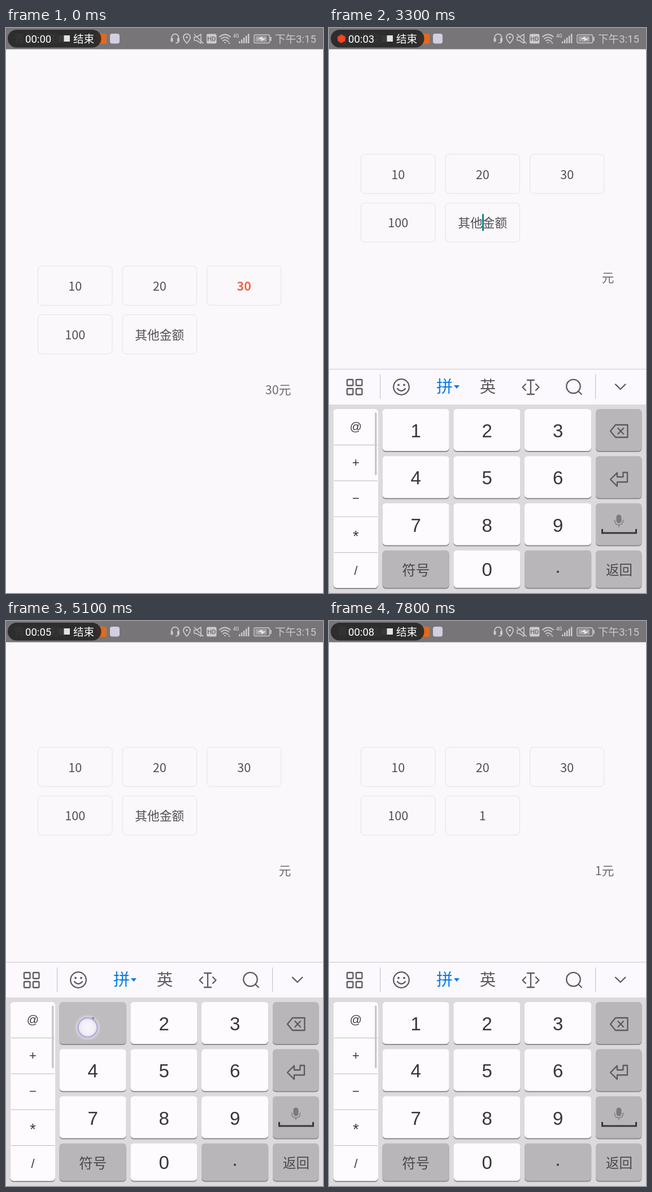
An HTML page for the animation above (8 s loop, 561 by 998 pixels).

```html
<!DOCTYPE html>
<html lang="zh">
<head>
<meta charset="utf-8">
<title>Amount picker</title>
<style>
html, body { margin: 0; width: 100%; height: 100%; overflow: hidden; background: #fbf8fc; }
svg { display: block; width: 100vw; height: 100vh; }
text { font-family: "Noto Sans CJK SC", "Noto Sans CJK", sans-serif; white-space: pre; }
.bar { font-family: Roboto, "Noto Sans CJK SC", "Noto Sans CJK", sans-serif; }
.num { font-family: "Liberation Sans", Arial, sans-serif; }
.line { fill: none; stroke: #5c5a5e; stroke-width: 2.3; stroke-linejoin: round; stroke-linecap: round; }
.icon { fill: none; stroke: #cccacc; stroke-width: 1.8; stroke-linecap: round; stroke-linejoin: round; }
</style>
</head>
<body>
<svg id="stage" viewBox="0 0 561 998" preserveAspectRatio="none">
  <defs>
    <radialGradient id="dot">
      <stop offset="0" stop-color="#faf8fc"/>
      <stop offset=".7" stop-color="#f3f0f8"/>
      <stop offset="1" stop-color="#dedaee"/>
    </radialGradient>
    <radialGradient id="glow">
      <stop offset=".7" stop-color="#e8e4f6" stop-opacity=".7"/>
      <stop offset="1" stop-color="#e8e4f6" stop-opacity="0"/>
    </radialGradient>
  </defs>
  <rect width="561" height="998" fill="#fbf8fc"/>
  <g id="page"></g>
  <g id="board"></g>
  <g id="status"></g>
  <g id="touch">
    <circle id="halo" r="24" fill="url(#glow)"/>
    <circle id="core" r="17" fill="url(#dot)"/>
    <circle id="ring" r="17" fill="none" stroke="#aaa5d6" stroke-width="2"/>
  </g>
</svg>
<script>
const LOOP = 8000, SHIFT = 197.5, HINT = '其他金额';
const $ = id => document.getElementById(id);

function add(parent, tag, attrs, content) {
  const el = document.createElementNS('http://www.w3.org/2000/svg', tag);
  for (const k in attrs) el.setAttribute(k, attrs[k]);
  if (content !== undefined) el.textContent = content;
  parent.appendChild(el);
  return el;
}
const rect = (p, x, y, width, height, fill, rx = 0, more = {}) =>
  add(p, 'rect', { x, y, width, height, fill, rx, ...more });
const label = (p, x, y, size, fill, str, more = {}) =>
  add(p, 'text', { x, y, 'font-size': size, fill, 'text-anchor': 'middle', ...more }, str);
const path = (p, d, cls, more = {}) => add(p, 'path', { d, class: cls, ...more });

// Amount buttons
const page = $('page');
const COLS = [56.5, 206, 355.5];
const buttons = ['10', '20', '30', '100', HINT].map((str, i) => {
  const x = COLS[i % 3], y = i < 3 ? 420.5 : 506.3;
  rect(page, x, y, 131.5, 69.3, '#fbf8fc', 7, { stroke: '#e5e1e7' });
  return label(page, x + 65.7, y + 43.5, 21.7, '#515053', str);
});
const field = buttons[4];
const total = label(page, 504.5, 646.5, 21.7, '#6d6b6f', '', { 'text-anchor': 'end' });
const caret = rect(page, 271, 526, 3, 30, '#10868e');

// Keyboard
const board = $('board');
rect(board, 0, 602, 561, 396, '#fbf9fd');
rect(board, 0, 602, 561, 1.3, '#d3d0d5');
rect(board, 0, 665, 561, 333, '#dddade');
for (const x of [32, 48]) for (const y of [621, 637])
  rect(board, x, y, 10.5, 10.5, 'none', 1.5, { class: 'line' });
for (const x of [90, 471]) rect(board, x, 612, 1.2, 43, '#c9c6cb');
add(board, 'circle', { cx: 128, cy: 634, r: 13.8, class: 'line' });
for (const cx of [123, 133]) add(board, 'circle', { cx, cy: 630.5, r: 1.9, fill: '#5c5a5e' });
path(board, 'M121 637q7 8 14 0', 'line');
label(board, 204.5, 644.3, 29, '#087be8', '拼');
path(board, 'M221 631h10l-5 6z', '', { fill: '#087be8' });
label(board, 281, 644.3, 28.5, '#5c5a5e', '英');
path(board, 'M351 622h12M351 647h12M357 622v25M348 629l-5.500 5.500 5.500 5.500M366 629l5.500 5.500-5.500 5.500', 'line');
add(board, 'circle', { cx: 432.5, cy: 633, r: 12.2, class: 'line' });
path(board, 'M441.500 642l5.500 5', 'line');
path(board, 'M507 629.500l8.700 8.500 8.700-8.500', 'line', { 'stroke-width': 2.6 });

function cap(x, y, w, h, fill) {
  rect(board, x, y + 2, w, h, '#8f8c91', 6);
  return rect(board, x, y, w, h, fill, 6);
}
const WHITE = '#fdfbfe', GREY = '#b9b6ba';
const ROWS = [673, 756.3, 839.6, 922.8];
const KEYX = [94.5, 220.3, 346];
const keys = {};
const rowH = r => r < 3 ? 74 : 66;

cap(7.5, 673, 79.5, 316, WHITE);
for (const y of [736, 799.3, 862.7, 926]) rect(board, 9, y, 77, 1, '#bdbabf');
rect(board, 81, 679, 3.5, 111, '#cac7cc', 1.7);
['@', '+', '−', '*', '/'].forEach((s, i) =>
  label(board, 47.5, [711, 775, 838, 907, 966][i], [21, 22, 22, 27, 22][i], '#3b393d', s, { class: 'num' }));

[...'123456789'].concat('符号', '0', '.').forEach((s, i) => {
  const r = Math.floor(i / 3), x = KEYX[i % 3], y = ROWS[r];
  const color = r === 3 && s !== '0' ? GREY : WHITE;
  keys[s] = { el: cap(x, y, 118.2, rowH(r), color), color, down: '#bfbcc0' };
  if (s === '符号') label(board, x + 59.3, 966.5, 24.5, '#4a484c', s);
  else if (s === '.') add(board, 'circle', { cx: 405, cy: 960.5, r: 2, fill: '#3b393d' });
  else label(board, x + 59.3, y + (r < 3 ? 50 : 45.500), 33, '#38363a', s, { class: 'num' });
});
ROWS.forEach((y, r) => {
  const el = cap(472, y, 81.5, rowH(r), GREY);
  if (!r) keys.del = { el, color: GREY, down: '#99969a' };
});
path(board, 'M498 712l9-11h21.500v22h-21.500zM511.500 707l9.500 10M521 707l-9.500 10', 'line', { 'stroke-width': 2.5 });
path(board, 'M498 797.500l12-12v7.500h10.500v-8h7.500v17h-18v7.500z', 'line', { 'stroke-width': 2.5 });
rect(board, 508.5, 859.5, 9, 15, '#7d7a7f', 4.5);
path(board, 'M505.500 869q0 8.500 7.500 8.500t7.500-8.500M513 877.500v4', 'line', { 'stroke-width': 1.4, style: 'stroke:#7d7a7f;stroke-width:1.400' });
path(board, 'M483.500 885v7h60v-7', '', { fill: 'none', stroke: '#38363a', 'stroke-width': 3 });
label(board, 513.5, 966, 23.5, '#4a484c', '返回');

// Status bar
const bar = $('status');
rect(bar, 0, 0, 561, 37.5, '#777577');
label(bar, 14, 26, 19, '#cccacc', '青禾讯联', { 'text-anchor': 'start' });
rect(bar, 90, 11, 1.2, 16, '#cccacc');
rect(bar, 93, 13, 10, 12, '#cccacc');
rect(bar, 160, 10, 18, 18, '#e2691f', 3);
rect(bar, 184, 10, 17, 17.5, '#d3cfe0', 4);
rect(bar, 3, 3, 165.5, 31.5, '#242324', 15.7, { 'fill-opacity': .87 });
const rec = path(bar, 'M22 12l6.300 3.500v7l-6.300 3.800-6.300-3.800v-7z', '', { fill: '#f5441e', stroke: '#f5441e', 'stroke-linejoin': 'round' });
const clock = label(bar, 34, 26, 18.6, '#fff', '', { class: 'bar', 'text-anchor': 'start' });
rect(bar, 102.5, 13, 10.5, 11, '#e4e2e4');
label(bar, 137.5, 26, 18.6, '#fff', '结束');

path(bar, 'M293 20v-3a6.300 6.300 0 0 1 12.600 0v3M305.500 23q0 3.500-4.500 3.500', 'icon');
for (const x of [291.5, 303]) rect(bar, x, 17.5, 4, 7, '#cccacc', 1.5);
path(bar, 'M320 27q-6-6.500-6-10.500a6 6 0 0 1 12 0q0 4-6 10.500z', 'icon');
add(bar, 'circle', { cx: 320, cy: 16.5, r: 1.8, fill: '#cccacc' });
path(bar, 'M333 16h4l8-5v16l-8-5h-4zM333 11l16 16', 'icon', { style: 'stroke-width:1.600' });
rect(bar, 355, 10.5, 17.5, 17, '#cccacc', 2.5);
label(bar, 363.7, 23.3, 11.5, '#777577', 'HD', { class: 'bar', 'font-weight': 700 });
path(bar, 'M378 15.500q9.500-8 19 0M381 19q6.500-5.500 13 0M384 22.500q3.500-3 7 0', 'icon', { style: 'stroke-width:2' });
path(bar, 'M385.500 25h4l-2 2.500zM391 24.500l2-2.500 2 2.500zM393 27.500l2-2.500 2 2.500z', '', { fill: '#cccacc' });
label(bar, 407.3, 17, 8.5, '#cccacc', '4G', { class: 'bar', 'font-weight': 500 });
for (let i = 0; i < 5; i++) rect(bar, 412 + i * 4, 23.5 - i * 3.3, 2.5, 3.5 + i * 3.3, '#cccacc');
rect(bar, 439, 12, 27.5, 14.500, 'none', 2.5, { class: 'icon', style: 'stroke-width:1.400' });
rect(bar, 441.3, 14.300, 20, 10, '#a3a1a3', 1);
rect(bar, 467.5, 15.5, 2.2, 7.5, '#cccacc', 1);
path(bar, 'M445 19.500l8.500-4.500-.5 3.500h7l-8.500 4.800.5-3.800z', '', { fill: '#f0eef0' });
label(bar, 549, 26, 18.6, '#cccacc', '下午3:15', { class: 'bar', 'text-anchor': 'end' });

// Timeline: taps are [x, y, down, up, key]
const TAPS = [
  [125, 462, 100, 200],
  [275, 462, 1700, 1900],
  [252.5, 557.5, 2550, 2700],
  [292, 964, 4100, 4300, '0'],
  [144.5, 718, 5100, 5200, '1'],
  [276, 718, 5500, 5600, '2'],
  [501, 722, 6700, 7300, 'del'],
];
const FADE = 300;
const CHOICE = [[0, '30'], [200, '10'], [1900, '20'], [2900, '']];
const TYPED = [[0, ''], [5200, '1'], [5600, '12'], [7300, '1']];
const BLINK = [[3000, 3000], [4300, 4300], [5200, 5200], [5600, 5600], [7300, 7300]];
const at = (list, t) => list.reduce((v, [from, val]) => t >= from ? val : v, undefined);
const show = (el, on) => el.setAttribute('visibility', on ? 'visible' : 'hidden');

function draw(t) {
  const sec = Math.floor((t + 200) / 1000);
  clock.textContent = '00:0' + sec;
  show(rec, (t + 200) % 1000 >= 500);

  const choice = at(CHOICE, t), typed = at(TYPED, t);
  buttons.forEach(b => {
    const on = b.textContent === choice && b !== field;
    b.setAttribute('fill', on ? '#ea694b' : '#515053');
    b.setAttribute('font-weight', on ? 700 : 400);
  });
  field.textContent = typed || HINT;
  total.textContent = (choice || typed) + '元';

  const since = at(BLINK, t);
  show(caret, since !== undefined && (t - since) % 1000 < 500);
  caret.setAttribute('x', 271 + typed.length * 6.2);

  page.setAttribute('transform', `translate(0 ${t >= 3000 ? -SHIFT : 0})`);
  const p = Math.min(1, Math.max(0, (t - 2900) / 300));
  board.setAttribute('transform', `translate(0 ${396 * (1 - p) ** 3})`);
  show(board, p > 0);

  for (const k in keys) keys[k].el.setAttribute('fill', keys[k].color);
  const tap = TAPS.find(([, , down, up]) => t >= down && t < up + FADE);
  $('touch').setAttribute('display', tap ? 'inline' : 'none');
  if (!tap) return;
  const [x, y, , up, key] = tap;
  if (key && t < up) keys[key].el.setAttribute('fill', keys[key].down);
  const a = 1 - Math.max(0, t - up) / FADE;
  $('touch').setAttribute('transform', `translate(${x} ${y})`);
  $('halo').setAttribute('opacity', a * a);
  $('core').setAttribute('opacity', .95 * a);
  $('ring').setAttribute('opacity', Math.min(1, a * 1.2));
}

const start = performance.now();
function tick() {
  draw((performance.now() - start) % LOOP);
  requestAnimationFrame(tick);
}
tick();
</script>
</body>
</html>
```
